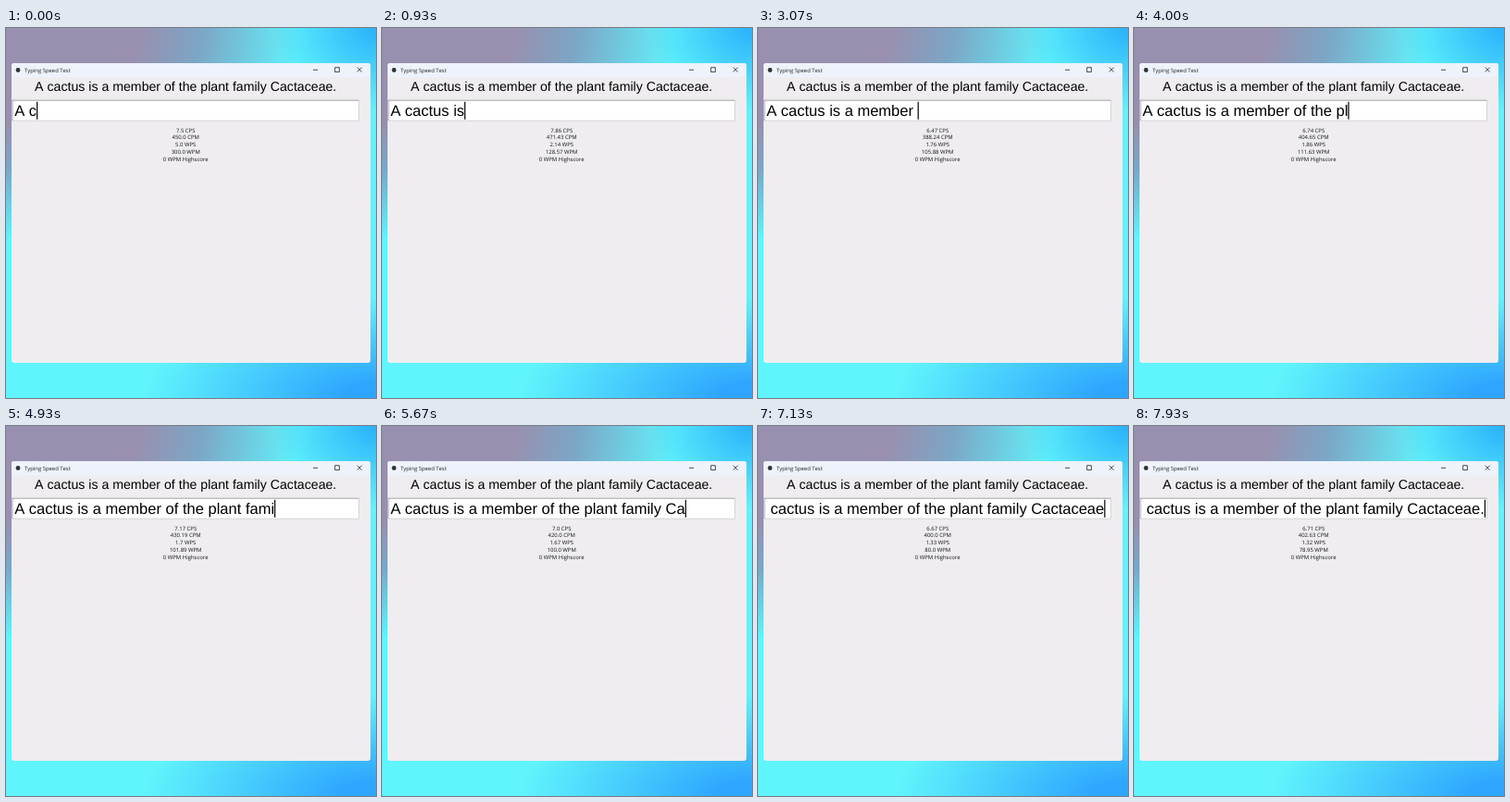
These frames come from a looping animation (400 px wide and 400 px high, 8000 ms). An HTML page with a canvas:

```html
<!DOCTYPE html>
<html lang="en">
<head>
<meta charset="utf-8">
<title>Typing Speed Test</title>
<style>
  html, body { margin: 0; width: 100%; height: 100%; overflow: hidden; }
  body {
    background:
      radial-gradient(ellipse 250px 110px at 100% 100%, #2ea6ff 15%, #2ea6ff00),
      radial-gradient(ellipse 110px 90px at 100% 0, #2cb4fb 5%, #2cb4fb00),
      radial-gradient(ellipse 320px 230px at 0 0, #998fae 45%, #7ca6c6 66%, #60f4fc);
  }
  canvas { display: block; width: 400px; height: 400px; }
</style>
</head>
<body>
<canvas id="stage"></canvas>
<script>
const SENTENCE = "A cactus is a member of the plant family Cactaceae.";
const LOOP = 8000, FPS = 15;
const ARIAL = '"Liberation Sans", Arial, sans-serif';
const UI = '"Open Sans", "Noto Sans", sans-serif';

// [ms, characters in the entry]; around 2.6 s two letters are typed and deleted again
const TYPING = [
  [-60, 3], [860, 11], [1000, 12], [1780, 17], [1920, 18], [2350, 21],
  [2600, 22], [2750, 23], [2880, 23.9], [2881, 22], [3050, 22.9], [3051, 21],
  [3180, 22], [4800, 38], [5000, 39], [6300, 47], [6500, 48], [6760, 49],
  [7000, 50], [7150, 51]
];
// [ms, test clock in tenths of a second]
const CLOCK = [[-60, 4], [910, 14], [1866, 23], [3040, 34], [4880, 53], [6370, 68], [7180, 76]];
const CLOCK_INVERSE = CLOCK.map(([ms, tenths]) => [tenths, ms]);

const canvas = document.getElementById("stage");
const ctx = canvas.getContext("2d");
const ratio = window.devicePixelRatio || 1;
canvas.width = canvas.height = 400 * ratio;
ctx.scale(ratio, ratio);
ctx.fontKerning = "none";
ctx.textRendering = "geometricPrecision";

function interpolate(points, x) {
  if (x <= points[0][0]) return points[0][1];
  for (let i = 1; i < points.length; i++) {
    const [x0, y0] = points[i - 1], [x1, y1] = points[i];
    if (x <= x1) return y0 + (y1 - y0) * (x - x0) / (x1 - x0);
  }
  return points[points.length - 1][1];
}

const stepAt = (points, x) => Math.floor(interpolate(points, x) + 1e-6);
const typedAt = ms => SENTENCE.slice(0, stepAt(TYPING, ms));

function rect(x, y, w, h, color) {
  ctx.fillStyle = color;
  ctx.fillRect(x, y, w, h);
}

function text(string, x, y, size, family, align = "left", color = "#000") {
  ctx.font = `${size}px ${family}`;
  ctx.textAlign = align;
  ctx.fillStyle = color;
  ctx.fillText(string, x, y);
}

function decimal(value) {
  const rounded = +value.toFixed(2);
  return Number.isInteger(rounded) ? rounded + ".0" : String(rounded);
}

function drawWindow() {
  ctx.save();
  ctx.beginPath();
  ctx.roundRect(6, 38, 388, 324, 3);
  ctx.clip();
  rect(6, 38, 388, 324, "#efedf0");
  rect(6, 38, 388, 15.5, "#eef2fa");
  ctx.restore();

  ctx.fillStyle = "#333";
  ctx.beginPath();
  ctx.arc(13, 45.5, 2.4, 0, 2 * Math.PI);
  ctx.fill();
  text("Typing Speed Test", 20, 47.8, 5.9, UI, "left", "#222");

  ctx.strokeStyle = "#222";
  ctx.lineWidth = 0.8;
  ctx.beginPath();
  ctx.moveTo(332, 45.3);
  ctx.lineTo(337, 45.3);
  ctx.rect(355.6, 42.7, 4.8, 4.8);
  ctx.moveTo(379.7, 42.6);
  ctx.lineTo(384.7, 47.6);
  ctx.moveTo(384.7, 42.6);
  ctx.lineTo(379.7, 47.6);
  ctx.stroke();

  text(SENTENCE, 194.2, 68.2, 14.15, ARIAL, "center");
}

function drawEntry(typed, caretOn) {
  rect(6.5, 77.7, 375, 22.6, "#a5a3a6");
  rect(7.4, 78.6, 374.1, 21.7, "#e3e1e4");
  rect(7.8, 79, 373.2, 20.6, "#fff");

  ctx.save();
  ctx.beginPath();
  ctx.rect(7.8, 79, 373.2, 20.6);
  ctx.clip();
  // The view scrolls past the first letter once the line outgrows the field
  const scrolled = typed.length >= 50;
  const x = scrolled ? 8.9 : 9.2;
  const visible = scrolled ? typed.slice(1) : typed;
  text(visible, x, 95, 16.52, ARIAL);
  if (caretOn) rect(x + ctx.measureText(visible).width, 79.8, 1.2, 19, "#000");
  ctx.restore();
}

function drawStats(ms) {
  const tenths = stepAt(CLOCK, ms);
  const counted = typedAt(interpolate(CLOCK_INVERSE, tenths));
  const cps = counted.length * 10 / tenths;
  const wps = counted.split(" ").length * 10 / tenths;
  [
    decimal(cps) + " CPS",
    decimal(cps * 60) + " CPM",
    decimal(wps) + " WPS",
    decimal(wps * 60) + " WPM",
    "0 WPM Highscore"
  ].forEach((line, i) => text(line, 194.2, 112.7 + i * 7.75, 5.95, UI, "center", "#111"));
}

function draw() {
  const step = Math.floor((performance.now() % LOOP + 5) * FPS / 1000) % (LOOP * FPS / 1000);
  const ms = step * 1000 / FPS;
  // Caret: 600 ms on, 300 ms off
  const caretOn = (step + 16) % 13.5 <= 9;
  ctx.clearRect(0, 0, 400, 400);
  drawWindow();
  drawEntry(typedAt(ms), caretOn);
  drawStats(ms);
  requestAnimationFrame(draw);
}
draw();
</script>
</body>
</html>
```
